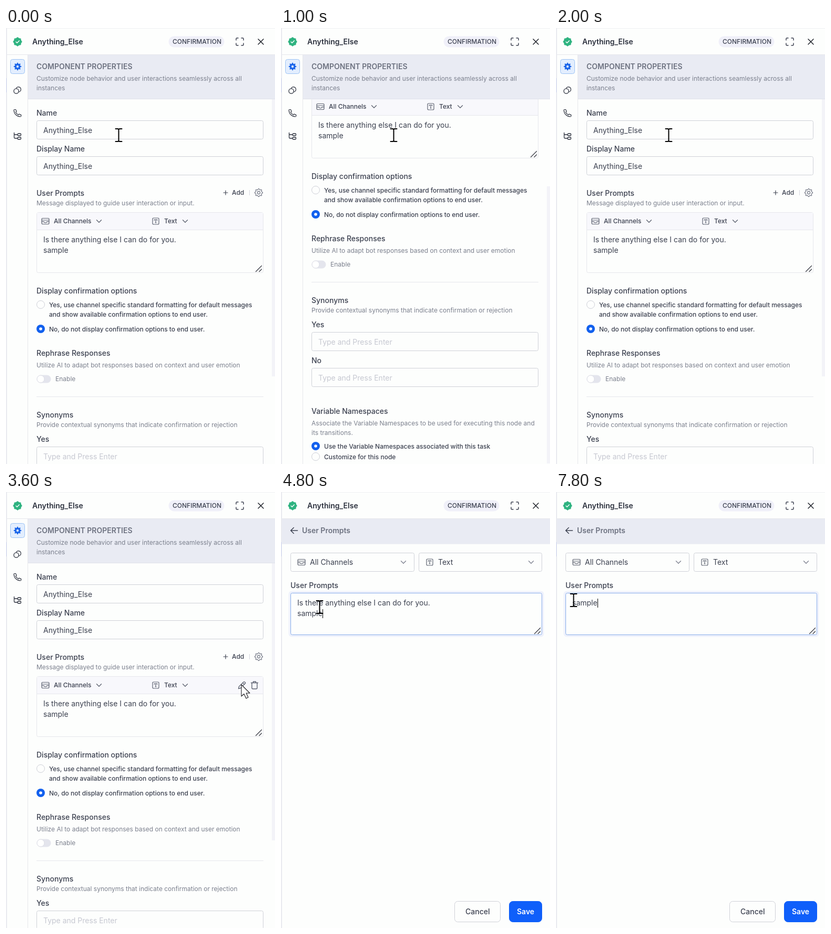
Animation of 512 by 826 pixels, one loop 8000 ms. Source, as an HTML page with a canvas:

```html
<!DOCTYPE html>
<html lang="en">
<head>
<meta charset="utf-8">
<title>Component properties</title>
<style>
html, body { margin: 0; width: 100%; height: 100%; overflow: hidden; background: #fdfefd; }
canvas { display: block; width: 512px; height: 826px; }
</style>
</head>
<body>
<canvas id="stage" width="512" height="826"></canvas>
<script>
const ctx = document.getElementById('stage').getContext('2d');
const LOOP = 8000, STEP = 200;
const PAGE = '#fdfefd', INK = '#3c4150', DARK = '#2b303d', MUTED = '#7c808e', BORDER = '#cfd1d8',
  BAND = '#e9ebf3', BLUE = '#1260ee', HINT = '#c6c8d1', RULE = '#e6e7ec';
const PROMPT = ['Is there anything else I can do for you.', 'sample'];

// Key poses: [time, value, ...]; values are interpolated linearly.
const SCROLL = [[400, 0], [600, 22], [800, 128], [1000, 217], [1600, 217], [1800, 85], [2000, 0]];
const POINTER = [[2200, 214, 203], [2600, 250, 240], [3000, 350, 318], [3400, 444, 364], [3600, 448, 365],
  [4000, 440, 356], [4400, 170, 246], [4600, 82, 221], [4800, 73, 218], [5000, 58, 213], [5200, 33, 205]];

function sample(keys, t) {
  if (t <= keys[0][0]) return keys[0].slice(1);
  for (let i = 1; i < keys.length; i++) {
    const [a, b] = [keys[i - 1], keys[i]];
    if (t <= b[0]) {
      const k = (t - a[0]) / (b[0] - a[0]);
      return a.slice(1).map((v, j) => v + (b[j + 1] - v) * k);
    }
  }
  return keys[keys.length - 1].slice(1);
}

// Text is placed by the vertical middle of its capitals.
function text(str, x, mid, size = 14, color = INK, weight = 400) {
  ctx.font = `${weight} ${size}px Inter, sans-serif`;
  ctx.fillStyle = color;
  ctx.fillText(str, x, mid + Math.round(size * 0.36));
}
const label = (str, y) => text(str, 58, y, 14, INK, 500);
const note = (str, y) => text(str, 58, y, 12, MUTED);

function rect(x, y, w, h, color) {
  ctx.fillStyle = color;
  ctx.fillRect(x, y, w, h);
}

function box(x, y, w, h, r, fill, stroke) {
  ctx.beginPath();
  ctx.roundRect(x + 0.5, y + 0.5, w - 1, h - 1, r);
  if (fill) { ctx.fillStyle = fill; ctx.fill(); }
  if (stroke) { ctx.strokeStyle = stroke; ctx.lineWidth = 1; ctx.stroke(); }
}

function disc(x, y, r, fill, stroke, width = 1) {
  ctx.beginPath();
  ctx.arc(x, y, r, 0, Math.PI * 2);
  if (fill) { ctx.fillStyle = fill; ctx.fill(); }
  if (stroke) { ctx.strokeStyle = stroke; ctx.lineWidth = width; ctx.stroke(); }
}

function path(x, y, d, color, width = 1.3, fill) {
  ctx.save();
  ctx.translate(x, y);
  const shape = new Path2D(d);
  if (fill) { ctx.fillStyle = fill; ctx.fill(shape); }
  ctx.strokeStyle = color;
  ctx.lineWidth = width;
  ctx.lineCap = ctx.lineJoin = 'round';
  ctx.stroke(shape);
  ctx.restore();
}

function gear(x, y, r, depth, teeth, fill, stroke) {
  ctx.beginPath();
  for (let i = 0; i < teeth * 4; i++) {
    const a = (i - 0.5) / (teeth * 2) * Math.PI;
    const d = i % 4 < 2 ? r : r - depth;
    ctx.lineTo(x + Math.sin(a) * d, y - Math.cos(a) * d);
  }
  ctx.closePath();
  ctx.lineJoin = 'round';
  if (fill) { ctx.fillStyle = fill; ctx.fill(); }
  if (stroke) { ctx.strokeStyle = stroke; ctx.lineWidth = 1.1; ctx.stroke(); }
}

const chevron = (x, y, color = '#5d6270') => path(x, y, 'M-4.5-2.2 0 2.3 4.5-2.2', color);
const channelIcon = (x, y) => path(x, y, 'M-5-5.5H5Q7-5.5 7-3.5V3.5Q7 5.5 5 5.5H-5Q-7 5.5-7 3.5V-3.5Q-7-5.5-5-5.5ZM-7-2H7M-7 .8H-3Q-2 3 0 3T3 .8H7', '#5d6270', 1.2);
const textIcon = (x, y) => path(x, y, 'M-4-6H4Q6-6 6-4V4Q6 6 4 6H-4Q-6 6-6 4V-4Q-6-6-4-6ZM-2.7-1.7V-3H2.7V-1.7M0-3V3M-1 3H1', '#5d6270', 1.2);
const grip = (x, y) => path(x, y, 'M0 0 11-11M6.5 0 11-4.5', '#33363f', 1.2);

function radio(y, on) {
  if (on) { disc(66, y, 8, BLUE); disc(66, y, 2.8, '#fff'); }
  else disc(66, y, 7.5, PAGE, BORDER);
}
const choice = (str, y) => text(str, 82, y, 12, INK, 500);

function field(y, str, color = INK) {
  box(58, y, 432, 36, 3, PAGE, BORDER);
  text(str, 71, y + 18.5, 14, color);
}

function header() {
  rect(0, 0, 512, 51, PAGE);
  rect(0, 0, 512, 1, '#eff0f3');
  rect(0, 50, 512, 1, RULE);
  gear(22, 26, 8.5, 1, 8, '#2fb380');
  path(22, 26, 'M-3 .2-.9 2.2 3.2-2', '#fff', 1.4);
  text('Anything_Else', 50, 26, 14, DARK, 600);
  box(309, 15, 107, 22, 11, '#f0f0f9');
  text('CONFIRMATION', 317, 26, 12, INK, 500);
  path(445, 26, 'M-7-3V-5.5Q-7-7-5.5-7H-3M3-7H5.5Q7-7 7-5.5V-3M7 3V5.5Q7 7 5.5 7H3M-3 7H-5.5Q-7 7-7 5.5V3', INK, 1.5);
  path(485, 26, 'M-5-5 5 5M5-5-5 5', '#20232b', 1.5);
}

function sidebar() {
  rect(0, 51, 42, 775, PAGE);
  rect(41, 51, 1, 775, RULE);
  box(8, 59, 28, 28, 4, '#e3eefe', '#9cc3f5');
  gear(22, 73, 7.3, 1.9, 8, '#1b66ea');
  disc(22, 73, 2.2, '#e3eefe');
  disc(19.5, 119.5, 4.6, null, DARK, 1.3);
  path(22, 117, 'M-2.5-3A4.8 4.8 0 1 1 3 4', DARK, 1.3);
  path(22, 161, 'M-6-6.5H-3.5L-2-3-3.5-1.3Q-2 2 1.5 3.5L3 2 6.7 3.6V6Q6.5 7 5.5 7Q-6 6-7-5.3Q-7-6.4-6-6.5Z', DARK, 1.2);
  path(22, 205, 'M-6.5-6.5V2Q-6.5 4-4.5 4H0M-6.5-3H0M1.5-5H5Q6.5-5 6.5-3T5-1H1.5Q0-1 0-3T1.5-5ZM1.5 2H5Q6.5 2 6.5 4T5 6H1.5Q0 6 0 4T1.5 2Z', DARK, 1.3);
}

function promptBox(hover) {
  box(58, 349, 432, 115, 3, PAGE, RULE);
  rect(59, 350, 430, 32, '#f8f8fc');
  rect(59, 382, 430, 1, RULE);
  channelIcon(75, 366);
  text('All Channels', 91, 366, 12, INK, 500);
  chevron(177, 366);
  textIcon(285, 366);
  text('Text', 301, 366, 12, INK, 500);
  chevron(341, 366);
  if (hover) {
    path(449, 366, 'M-6.5 6.5-5.5 2.5 3-6Q4.5-7 6-5.5T6 -3L-2.5 5.5ZM1.5-4.5 4.5-1.5', '#5d6270', 1.3);
    path(473, 366, 'M-6.5-4.5H6.5M-2.5-4.5V-6.8H2.5V-4.5M-5-4.5V5Q-5 7-3 7H3Q5 7 5 5V-4.5', '#5d6270', 1.4);
  }
  PROMPT.forEach((line, i) => text(line, 71, 401 + i * 20));
  grip(475.5, 461.5);
}

function properties(scroll, hover) {
  ctx.save();
  ctx.beginPath();
  ctx.rect(42, 135, 470, 691);
  ctx.clip();
  rect(506, 135 + scroll * 0.76, 6, 525, '#f3f3f8');
  ctx.translate(0, -scroll);

  label('Name', 161);
  field(175, 'Anything_Else');
  label('Display Name', 229);
  field(243, 'Anything_Else');

  label('User Prompts', 313);
  path(418, 312, 'M-4 0H4M0-4V4', INK, 1.2);
  text('Add', 430, 312, 12, INK, 500);
  rect(463, 307, 1, 10, '#d5d7de');
  gear(481, 312, 7.5, 1.7, 8, null, '#6d7280');
  disc(481, 312, 2.6, null, '#6d7280', 1.1);
  note('Message displayed to guide user interaction or input.', 332);
  promptBox(hover);

  label('Display confirmation options', 498);
  radio(524, false);
  choice('Yes, use channel specific standard formatting for default messages', 525);
  choice('and show available confirmation options to end user.', 543);
  radio(570, true);
  choice('No, do not display confirmation options to end user.', 571);

  label('Rephrase Responses', 616);
  note('Utilize AI to adapt bot responses based on context and user emotion', 639);
  box(58, 657, 28, 16, 8, '#e4e5ed');
  disc(66, 665, 7, '#fff', '#dcdde5');
  text('Enable', 94, 665, 12, MUTED);
  rect(58, 698, 432, 1, RULE);

  label('Synonyms', 733);
  note('Provide contextual synonyms that indicate confirmation or rejection', 752);
  label('Yes', 779);
  field(793, 'Type and Press Enter', HINT);
  label('No', 847);
  field(861, 'Type and Press Enter', HINT);

  label('Variable Namespaces', 943);
  note('Associate the Variable Namespaces to be used for executing this node and', 966);
  note('its transitions.', 984);
  radio(1009, true);
  choice('Use the Variable Namespaces associated with this task', 1010);
  radio(1029, false);
  choice('Customize for this node', 1030);
  ctx.restore();

  sidebar();
  rect(42, 51, 470, 84, BAND);
  rect(42, 134, 470, 1, '#e0e2ea');
  text('COMPONENT PROPERTIES', 58, 73, 14, '#6d7280', 600);
  note('Customize node behavior and user interactions seamlessly across all', 96);
  note('instances', 114);
}

function dropdown(x, w, icon, str) {
  box(x, 115, w, 36, 3, PAGE, BORDER);
  icon(x + 21, 133);
  text(str, x + 37, 133, 14, INK);
  chevron(x + w - 21, 133, '#7c808e');
}

function textarea(t) {
  const focused = t >= 4000, selected = t >= 5400 && t < 6400;
  const typed = Math.max(0, Math.floor((t - 6800) / STEP) + 1);
  const lines = t < 6400 ? PROMPT : ['sample'.slice(0, typed)];
  if (focused) box(14, 187, 487, 88, 6, '#eff2fc');
  box(18, 191, 479, 80, 3, PAGE, focused ? '#86abea' : BORDER);
  lines.forEach((line, i) => {
    const y = 210 + i * 20;
    ctx.font = '400 14px Inter, sans-serif';
    const width = ctx.measureText(line).width;
    if (selected) rect(31, y - 9, width + (i ? 0 : 4), 18, '#3390ff');
    text(line, 31, y, 14, selected ? '#fff' : INK);
    const blinkOn = t >= 6400 || (t - 4000) % 800 < 400;
    if (focused && !selected && blinkOn && i === lines.length - 1) rect(Math.round(31 + width), y - 8, 1, 17, '#000');
  });
  grip(482.5, 268.5);
}

function editor(t) {
  rect(0, 51, 512, 47, BAND);
  rect(0, 98, 512, 1, '#f1f2f6');
  path(25, 73, 'M6.5 0H-6M-.8-5.5-6.5 0-.8 5.5', INK, 1.5);
  text('User Prompts', 40, 73, 14, '#6d7280', 600);
  dropdown(18, 236, channelIcon, 'All Channels');
  dropdown(262, 235, textIcon, 'Text');
  text('User Prompts', 18, 177, 14, INK, 500);
  textarea(t);
  box(330, 775, 88, 40, 6, PAGE, BORDER);
  text('Cancel', 351, 795, 14, INK, 500);
  box(434, 775, 63, 40, 7, '#0f5ffa', '#0f5ffa');
  text('Save', 449, 795, 14, '#fff', 600);
}

function pointer(x, y, beam) {
  if (beam) {
    path(x + 0.5, y, 'M-6-12H-2Q0-12 0-10Q0-12 2-12H6M0-10V10M-6 12H-2Q0 12 0 10Q0 12 2 12H6', '#000', 2);
  } else {
    path(x, y, 'M0 0V22.5L5-17.5'.slice(0, 0) + 'M0 0V22L5 17.5 9 26 13 24 9.2 16H16Z', '#1b1b1f', 1.1, '#fff');
  }
}

function render(t) {
  const [x, y] = sample(POINTER, t), editing = t >= 3800;
  rect(0, 0, 512, 826, PAGE);
  if (editing) editor(t);
  else properties(sample(SCROLL, t)[0], t >= 2200 && y > 349);
  header();
  rect(0, 0, 2, 826, '#eaebf0');
  rect(0, 95, 1, 27, '#cfd6f2');
  const beam = editing ? y > 191 && y < 271 && x < 497 : y < 211 || (y > 243 && y < 279);
  pointer(x, y, beam);
}

const start = performance.now();
function tick() {
  const t = (performance.now() - start) % LOOP;
  render(Math.floor(t / STEP) * STEP);
  requestAnimationFrame(tick);
}
tick();
</script>
</body>
</html>
```
